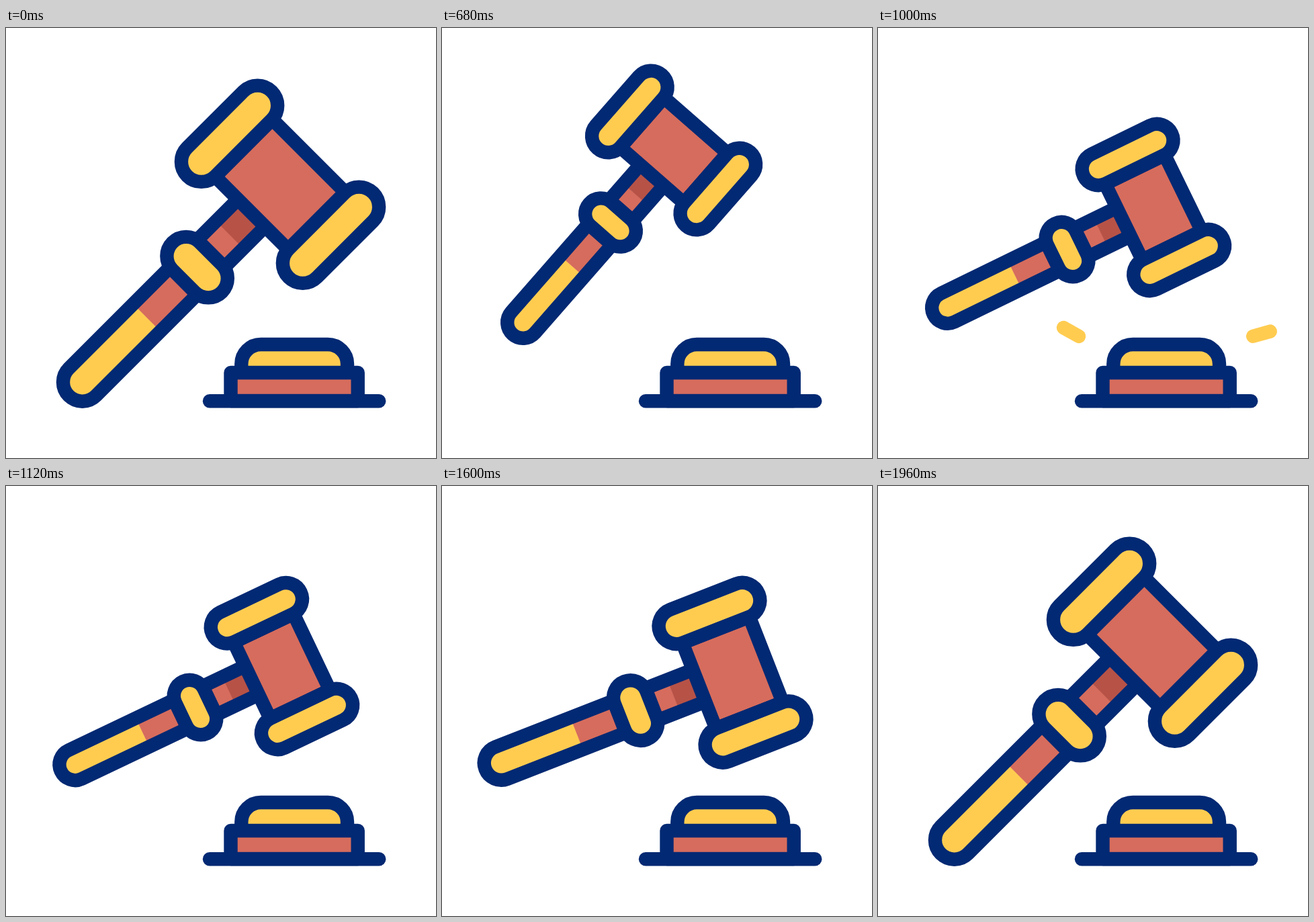
Write an HTML page with a canvas that moves like this. It is 640 px wide and 640 px high and loops after 2 s.

```html
<!DOCTYPE html>
<html lang="en">
<head>
<meta charset="utf-8">
<title>Gavel</title>
<style>
html, body { margin: 0; width: 100%; height: 100%; overflow: hidden; background: #fff; }
canvas { display: block; width: 640px; height: 640px; }
</style>
</head>
<body>
<canvas id="stage" width="640" height="640"></canvas>
<script>
const ctx = document.getElementById('stage').getContext('2d');
const NAVY = '#022973', RED = '#d66c5d', DARK = '#b75247', YELLOW = '#ffcc50';
const LINE = 20.4, LOOP = 2000, STEP = 40;

// time, tilt in degrees, scale, centre x, centre y
const keys = [
  [0, 45, 1.222, 282, 358.7],
  [80, 45, 1.222, 282, 358.7],
  [320, 46.8, 1.087, 265.6, 301],
  [500, 48.5, 1, 253, 293],
  [630, 49.3, 1, 248.7, 291.5],
  [680, 48.8, 1, 249, 291.7],
  [860, 0, 1, 282.5, 337.8],
  [1000, 26, 1, 278.8, 330.9],
  [1070, 29, 1, 278.3, 329.8],
  [1300, 0, 1, 282.5, 337.8],
  [1320, 0, 1, 282.5, 337.8],
  [1600, 21.35, 1.085, 285.1, 335.3],
  [1760, 38.7, 1.17, 284, 348],
  [1900, 45, 1.214, 282.3, 357.6],
  [1960, 45, 1.222, 282, 358.7],
  [2000, 45, 1.222, 282, 358.7]
];

const rise = (i, c) => (keys[i + 1][c] - keys[i][c]) / (keys[i + 1][0] - keys[i][0]);

// Slope at a key: flat at turning points, harmonic mean elsewhere
function slope(i, c) {
  if (i === 0 || i === keys.length - 1) return 0;
  const a = rise(i - 1, c), b = rise(i, c);
  return a * b <= 0 ? 0 : 2 * a * b / (a + b);
}

function pose(t) {
  let i = 0;
  while (i < keys.length - 2 && t >= keys[i + 1][0]) i++;
  const h = keys[i + 1][0] - keys[i][0], u = (t - keys[i][0]) / h, v = 1 - u;
  return [1, 2, 3, 4].map(c =>
    v * v * (1 + 2 * u) * keys[i][c] + u * u * (3 - 2 * u) * keys[i + 1][c] +
    h * u * v * (v * slope(i, c) - u * slope(i + 1, c)));
}

function paint(fill) {
  if (fill) {
    ctx.fillStyle = fill;
    ctx.fill();
  }
  ctx.strokeStyle = NAVY;
  ctx.stroke();
}

function block(x, y, w, h, color) {
  ctx.fillStyle = color;
  ctx.fillRect(x, y, w, h);
}

// Capsule given by its centre and half sizes
function pill(cx, cy, hw, hh) {
  ctx.beginPath();
  ctx.roundRect(cx - hw, cy - hh, hw * 2, hh * 2, Math.min(hw, hh));
  paint(YELLOW);
}

function drawBase() {
  ctx.lineWidth = LINE;
  ctx.beginPath();
  ctx.moveTo(350.3, 513);
  ctx.lineTo(350.3, 500);
  ctx.arcTo(350.3, 471, 380, 471, 29);
  ctx.lineTo(479, 471);
  ctx.arcTo(508, 471, 508, 500, 29);
  ctx.lineTo(508, 513);
  paint(YELLOW);
  ctx.beginPath();
  ctx.rect(334.5, 513, 189.2, 42);
  paint(RED);
  ctx.beginPath();
  ctx.moveTo(303, 555.2);
  ctx.lineTo(555.2, 555.2);
  paint();
}

function drawGavel(t) {
  const [tilt, scale, x, y] = pose(t);
  ctx.save();
  ctx.translate(x, y);
  ctx.rotate(-tilt * Math.PI / 180);
  ctx.scale(scale, scale);
  ctx.translate(-282.5, -337.8);
  ctx.lineWidth = LINE / scale;

  const top = 314.3, bottom = 361.3, mid = 337.8, r = 23.5;
  ctx.beginPath();
  ctx.moveTo(199, top);
  ctx.lineTo(87.7, top);
  ctx.arc(87.7, mid, r, -Math.PI / 2, Math.PI / 2, true);
  ctx.lineTo(199, bottom);
  ctx.fillStyle = YELLOW;
  ctx.fill();
  block(198.7, top, 143, r * 2, RED);
  block(341.3, top, 38, r * 2, DARK);
  ctx.beginPath();
  ctx.moveTo(379, top);
  ctx.lineTo(87.7, top);
  ctx.arc(87.7, mid, r, -Math.PI / 2, Math.PI / 2, true);
  ctx.lineTo(379, bottom);
  paint();

  pill(285.5, mid, 23.5, 42.6);
  ctx.beginPath();
  ctx.rect(379.1, 275, 98.5, 126);
  paint(RED);
  pill(428.3, 250.5, 72.8, 24.4);
  pill(428.3, 425.2, 72.8, 24.4);
  ctx.restore();
}

const clamp = v => Math.max(0, Math.min(1, v));

function spark(x0, y0, x1, y1, tail, head) {
  const at = p => [x0 + (x1 - x0) * p, y0 + (y1 - y0) * p];
  ctx.beginPath();
  ctx.moveTo(...at(tail));
  ctx.lineTo(...at(head));
  ctx.stroke();
}

function drawSparks(age) {
  const head = clamp(age / 160), tail = clamp((age - 120) / 160);
  if (head <= tail) return;
  ctx.lineWidth = LINE;
  ctx.strokeStyle = YELLOW;
  spark(322, 471.8, 276, 446, tail, head);
  spark(532.5, 466, 583.8, 451.6, tail, head);
}

function frame() {
  const t = Math.floor(performance.now() % LOOP / STEP) * STEP;
  ctx.fillStyle = '#fff';
  ctx.fillRect(0, 0, 640, 640);
  ctx.lineCap = ctx.lineJoin = 'round';
  drawSparks(t - 800);
  drawSparks(t - 1240);
  drawBase();
  drawGavel(t);
  requestAnimationFrame(frame);
}
frame();
</script>
</body>
</html>
```
